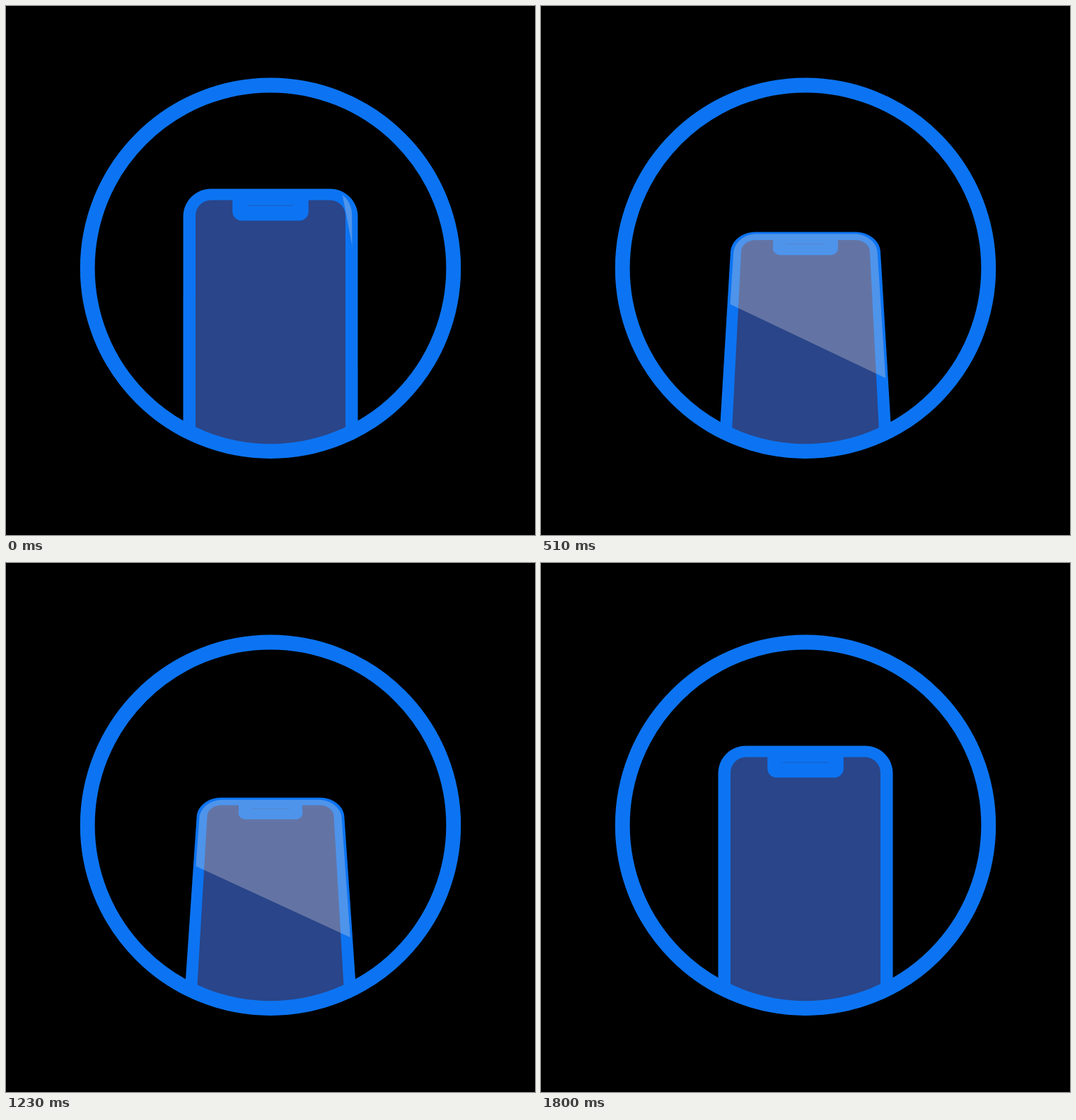
An HTML page for the animation above (2700 ms loop, 748x748 px).

```html
<!DOCTYPE html>
<html lang="en">
<head>
<meta charset="utf-8">
<title>Tilting phone</title>
<style>
  html, body { margin: 0; width: 100%; height: 100%; overflow: hidden; background: #000; }
  svg { display: block; width: 100vw; height: 100vh; }
</style>
</head>
<body>
<svg viewBox="0 0 748 748">
  <defs>
    <clipPath id="porthole"><circle cx="374" cy="370.8" r="258"/></clipPath>
    <clipPath id="wedge"><polygon id="wedgeShape"/></clipPath>
  </defs>
  <rect width="748" height="748" fill="#000"/>
  <g clip-path="url(#porthole)">
    <polygon id="body" fill="#0c74f2"/>
    <polygon id="screen" fill="#2a4589"/>
    <polygon id="notch" fill="#0c74f2"/>
    <polygon id="speaker" fill="#1a5cc4"/>
    <g clip-path="url(#wedge)"><polygon id="glare" fill="#d9d7de" fill-opacity=".32"/></g>
  </g>
  <circle cx="374" cy="370.8" r="258.8" fill="none" stroke="#0c74f2" stroke-width="20.8"/>
</svg>
<script>
const LOOP = 2700, STEP = 30;
const START = -30, PEAK = 870, END = 1770, GLARE_OFF = 1800;
const CENTER = 374, HINGE = 266, CAMERA = 1039;
const FLOOR = -15;
const $ = id => document.getElementById(id);
const rad = deg => deg * Math.PI / 180;
const clamp = v => Math.min(1, Math.max(0, v));

// Cubic bezier easing with flat ends; x1 and x2 are the handle times.
function ease(x, x1, x2) {
  let lo = 0, hi = 1;
  for (let i = 0; i < 30; i++) {
    const u = (lo + hi) / 2, v = 1 - u;
    if (3 * v * v * u * x1 + 3 * v * u * u * x2 + u * u * u < x) lo = u; else hi = u;
  }
  return lo * lo * (3 - 2 * lo);
}

// Points are [x from the axis, height above the hinge] on the phone plane.
function project([x, h], tilt) {
  const k = 1 + h * Math.sin(tilt) / CAMERA;
  return [CENTER + x / k, CENTER + (HINGE - h * Math.cos(tilt)) / k];
}

function draw(id, points, tilt) {
  $(id).setAttribute('points',
    points.map(p => project(p, tilt).map(v => v.toFixed(2)).join()).join(' '));
}

function arc(cx, cy, r, from) {
  return Array.from({ length: 17 }, (_, i) => {
    const a = rad(from - i * 90 / 16);
    return [cx + r * Math.cos(a), cy + r * Math.sin(a)];
  });
}

// Slab with rounded top corners, widening by flare at the bottom.
function slab(half, top, r, flare = 0) {
  return [
    [-half - flare, FLOOR],
    ...arc(r - half, top - r, r, 180),
    ...arc(half - r, top - r, r, 90),
    [half + flare, FLOOR]
  ];
}

const bodyShape = slab(123.5, 381.5, 39);
const screenShape = slab(106, 365.5, 22);
const notchShape = [
  [-53.8, 368], [53.8, 368],
  ...arc(40.8, 349.5, 13, 0),
  ...arc(-40.8, 349.5, 13, -90)
];
const speakerShape = [[-33.5, 358.5], [33.5, 358.5], [31.5, 357.4], [-31.5, 357.4]];

function render(t) {
  const rise = clamp((t - START) / (PEAK - START));
  const fall = clamp((t - PEAK) / (END - PEAK));
  const degrees = 40 * (t < PEAK ? ease(rise, 0.446, 0.446) : 1 - ease(fall, 0.73, 0.56));
  const tilt = rad(degrees);
  const sweep = rad(79.5 - 64.5 * ease(t < PEAK ? rise : 1 - fall, 0.294, 0.412));

  draw('body', bodyShape, tilt);
  draw('screen', screenShape, tilt);
  draw('notch', notchShape, tilt);
  draw('speaker', speakerShape, tilt);

  const top = 381.5 - 0.004 * degrees * degrees;
  draw('glare', slab(115.2 + 0.11 * degrees, top, 37, 2), tilt);
  const px = 153, ph = 104;
  const qx = px - 450 * Math.cos(sweep), qh = ph + 450 * Math.sin(sweep);
  draw('wedgeShape', [[px, ph], [qx, qh], [qx, 650], [px, 650]], tilt);
  $('glare').style.display = t < GLARE_OFF ? '' : 'none';
}

const begin = performance.now();
function tick() {
  const t = (performance.now() - begin) % LOOP;
  render(Math.floor(t / STEP) * STEP);
  requestAnimationFrame(tick);
}
tick();
</script>
</body>
</html>
```
